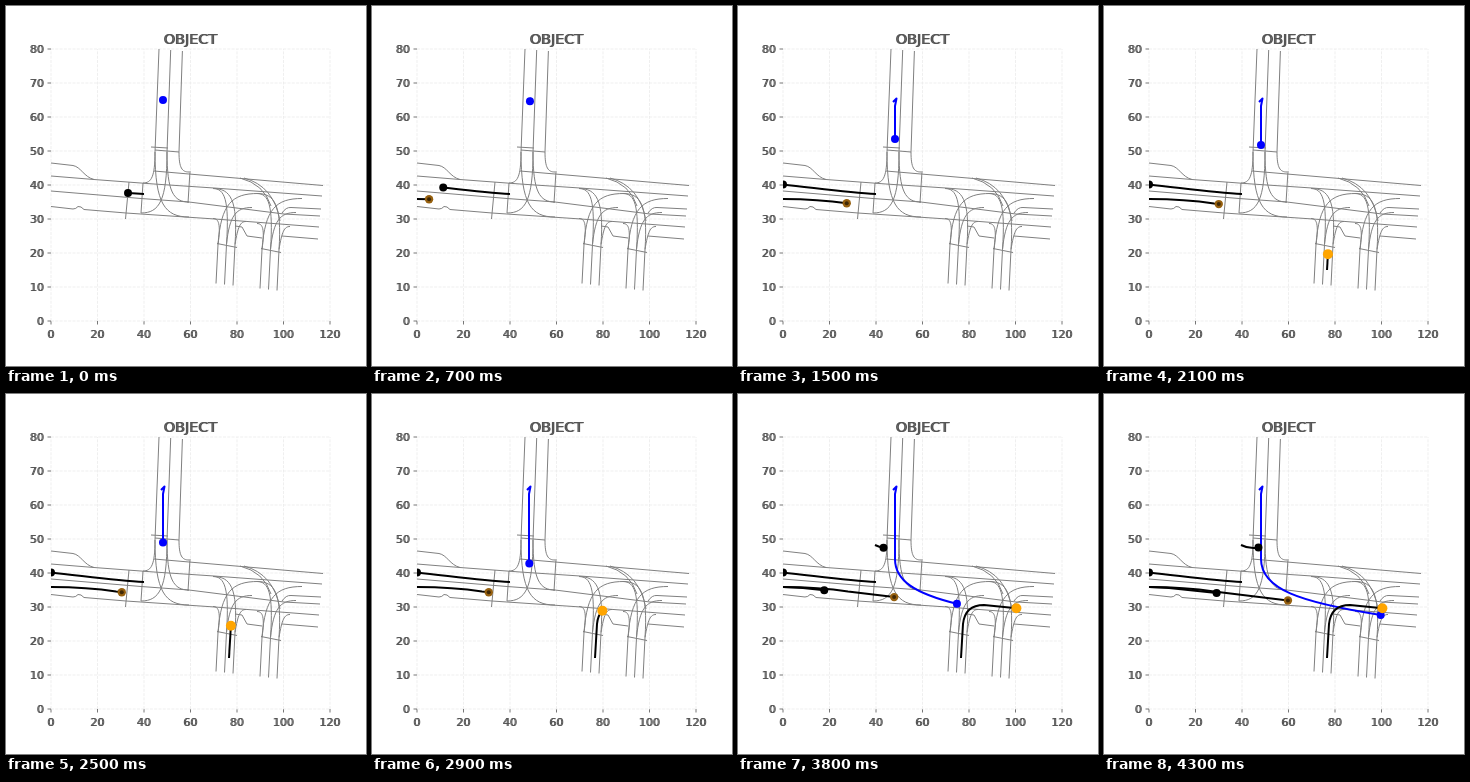
These frames come from a looping animation (360x360 px, 4.4 s). An HTML page:

```html
<!DOCTYPE html>
<html lang="en">
<head>
<meta charset="utf-8">
<title>Object tracks</title>
<style>
html, body { margin: 0; width: 100%; height: 100%; overflow: hidden; background: #fff; }
svg { display: block; width: 100vw; height: 100vh; }
text { font-family: "DejaVu Sans", sans-serif; font-size: 11px; fill: #555; }
.title { font-size: 14.4px; }
.grid { stroke: #ebebeb; stroke-width: .8; stroke-dasharray: 3 1.3; }
.tick { stroke: #555; stroke-width: .8; }
#roads path { fill: none; stroke: #808080; stroke-width: 1; }
#trails path { fill: none; stroke-width: 2; stroke-linejoin: round; }
</style>
</head>
<body>
<svg viewBox="0 0 360 360">
  <defs><clipPath id="plot"><rect x="45" y="43" width="279" height="272"/></clipPath></defs>
  <g id="axes"></g>
  <g clip-path="url(#plot)">
    <g id="roads">
      <!-- main road, top lane to bottom lane -->
      <path d="M45 157L67 159.500C75 161 78 171 88 173.500M148 165L317 179.500"/>
      <path d="M45 170L88 173.500L148 178L208 182L316 190"/>
      <path d="M45 185L135 192.500L183 196L278 208L314 210M276 207Q280 201 285 201.500L315 203"/>
      <path d="M45 200.500L67 203Q70 203 72 200.500Q75 200 78 203.500L120 207L209 213L313 221"/>
      <path d="M229 220L236 221L241 230L256 232M276 230L312 233"/>
      <!-- crossings -->
      <path d="M145 141L162 142M149 144L173 146M123 176L119.500 213M137 177L135 207M184 165L182 197"/>
      <!-- long turns into the east arm -->
      <path d="M234 172Q258 178 265 200M238 172Q268 180 274 215"/>
    </g>
    <g id="trails"></g>
    <g id="dots"></g>
  </g>
</svg>
<script>
const STEP = 100, COUNT = 44;
const $ = id => document.getElementById(id);

function add(parent, tag, attrs, text) {
  const el = document.createElementNS("http://www.w3.org/2000/svg", tag);
  for (const name in attrs) el.setAttribute(name, attrs[name]);
  if (text !== undefined) el.textContent = text;
  return parent.appendChild(el);
}

// Labels are printed twice, slightly apart, which thickens the upright strokes.
function label(text, x, y, anchor, cls = "") {
  for (const dx of [-0.6, 0.6]) {
    add($("axes"), "text", { x: x + dx, y, "text-anchor": anchor, class: cls }, text);
  }
}

function drawAxes() {
  const line = (cls, d) => add($("axes"), "path", { class: cls, d });
  for (let v = 0; v <= 120; v += 20) {
    const x = 45 + v * 2.325;
    line("grid", `M${x} 315V43`);
    line("tick", `M${x} 315v3.5`);
    label(v, x, 331.5, "middle");
  }
  for (let v = 0; v <= 80; v += 10) {
    const y = 315 - v * 3.4;
    line("grid", `M45 ${y}H324`);
    line("tick", `M45 ${y}h-3.5`);
    label(v, 38, y + 4, "end");
  }
  label("OBJECT", 184.5, 37.5, "middle", "title");
}

const road = d => add($("roads"), "path", { d });

// Leaves a lane upright and bends into the crossing road.
function turn(x, y, toX, toY, lean = 0) {
  const top = x + lean;
  road(`M${x} ${y}C${top} ${y + (toY - y) * 0.8} ${top + (toX - top) * 0.3} ${toY} ${toX} ${toY}`);
}

function northArm() {
  for (let i = 0; i < 3; i++) road(`M${153 + 11.7 * i} ${43 + i}L${149 + 12 * i} 146`);
  turn(149, 146, 137, 177);
  turn(149, 146, 183, 211);
  turn(161, 146, 135, 207);
  turn(161, 146, 183, 196);
  turn(173, 146, 183, 166);
}

function southArm(x, y) {
  const top = y - 39;
  const lane = i => x + 2 + 8.5 * i;
  for (let i = 0; i < 3; i++) {
    road(`M${x + 8.5 * i} ${y + i}L${lane(i)} ${top}`);
    turn(lane(i), top, x - 3, i ? y - 95 : y - 65, 3);
    turn(lane(i), top, x + 42 - 6 * i, y - 90 + 14 * i, 3);
  }
  road(`M${x + 1} ${y - 40}L${x + 21} ${y - 36}`);
}

// Distance covered at a steady speed between two steps.
const cruise = (k, from, to, speed) => speed * Math.max(0, Math.min(k, to) - from);

// Distance covered while slowing to a stop.
function brake(k, from, to, length) {
  const u = Math.max(0, Math.min(1, (k - from) / (to - from)));
  return length * (1 - (1 - u) ** 1.5);
}

// Each object follows a route; gone(k) is the distance travelled by step k.
const objects = [
  { start: 0, color: "#000", r: 4, route: "M138 188C110 187 78 182 45 178.5",
    gone: k => 16 + 7.3 * k },
  { start: 30, color: "#000", r: 4, route: "M44 193L65 194L113 199",
    gone: k => 5.3 * (k - 30) },
  { start: 33, color: "#000", r: 4, route: "M137 151Q146 155.5 154.5 153.5",
    gone: k => 1.8 * (k - 33) },
  { start: 5, color: "#000", dot: "#96600f", core: "#402907", r: 4.2,
    route: "M41 193Q80 193 110 197.5L184 206.5",
    gone: k => brake(k, 5.2, 17, 73) + cruise(k, 17, 31, 0.25) + cruise(k, 31, COUNT, 5.6) },
  { start: 0, color: "#00f", r: 4,
    route: "M155 96L158.5 92.5L157 100V165C157 195 195 208 277 221",
    gone: k => 2.8 + cruise(k, 0, 8, 0.7) + cruise(k, 8, 15, 5.3) + cruise(k, 15, 21, 1)
      + 0.93 * Math.max(0, k - 21) ** 1.68 },
  { start: 18, color: "#000", dot: "#ffa500", r: 5,
    route: "M223 264L225 230Q227 211 246 211L280.5 214.5",
    gone: k => cruise(k, 18, 21, 5.3) + cruise(k, 21, 29, 4.1) + cruise(k, 29, 36, 7.1) }
];

function setup() {
  drawAxes();
  northArm();
  southArm(210, 277.5);
  southArm(254, 282.5);
  for (const o of objects) {
    o.trail = add($("trails"), "path", { stroke: o.color, d: o.route });
    o.length = o.trail.getTotalLength();
    o.marker = add($("dots"), "g", {});
    add(o.marker, "circle", { r: o.r, fill: o.dot || o.color });
    if (o.core) add(o.marker, "circle", { r: 2, fill: o.core });
  }
}

function render(k) {
  for (const o of objects) {
    o.trail.style.display = o.marker.style.display = k < o.start ? "none" : "inline";
    if (k < o.start) continue;
    const gone = Math.min(o.length, o.gone(k));
    const { x, y } = o.trail.getPointAtLength(gone);
    o.trail.setAttribute("stroke-dasharray", `${gone} ${o.length + 1}`);
    o.marker.setAttribute("transform", `translate(${x} ${y})`);
  }
}

setup();
const begin = performance.now();
function tick() {
  render(Math.floor((performance.now() - begin) / STEP) % COUNT);
  requestAnimationFrame(tick);
}
tick();
</script>
</body>
</html>
```
